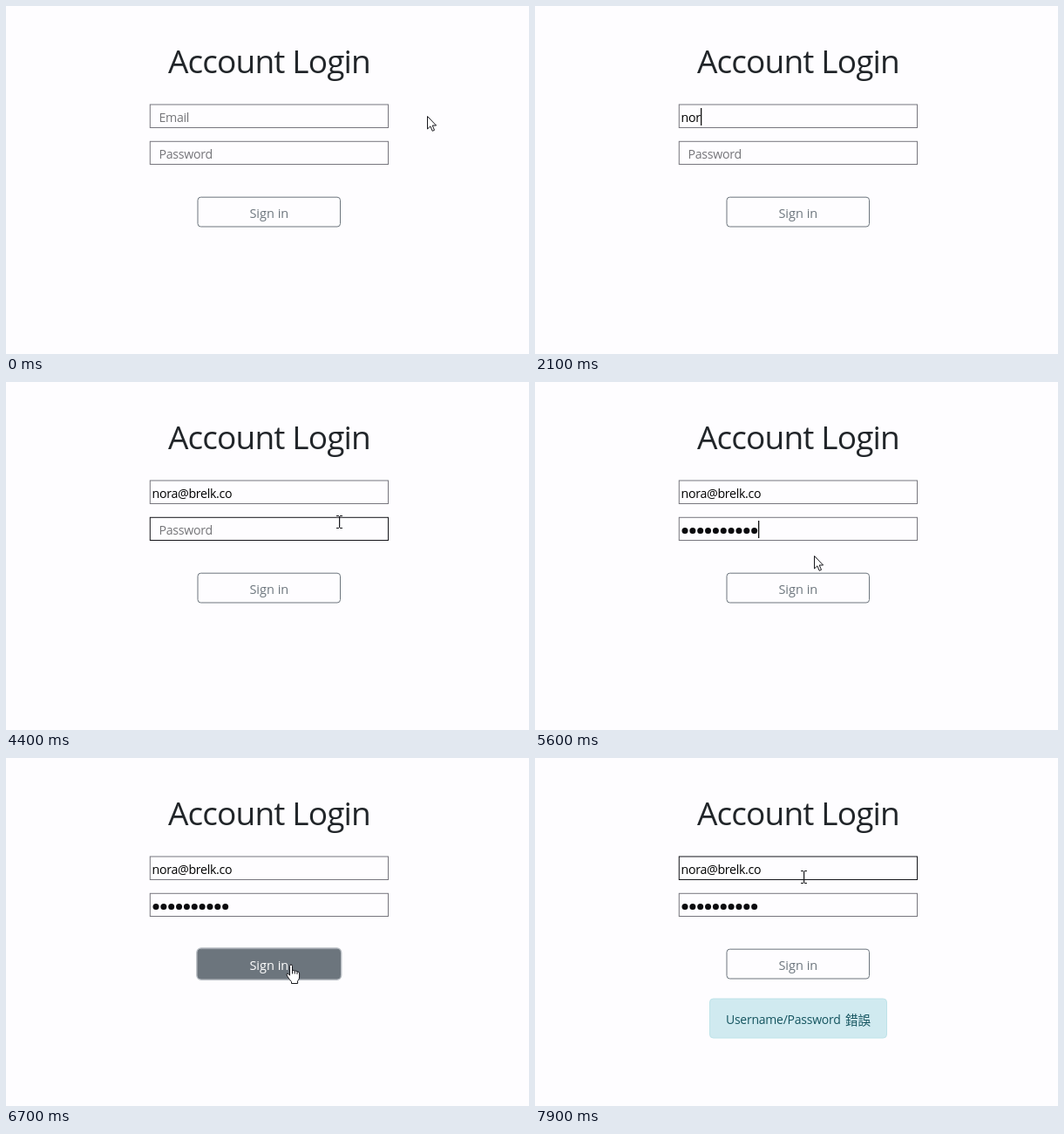
These frames come from a looping animation (600x399 px, 8 s). An HTML page with a canvas:

```html
<!DOCTYPE html>
<html lang="zh-Hant">
<head>
<meta charset="utf-8">
<title>Account Login</title>
<style>
  html, body { margin: 0; width: 100%; height: 100%; overflow: hidden; background: #fefdff; }
  canvas { display: block; }
</style>
</head>
<body>
<canvas id="stage" width="600" height="399"></canvas>
<script>
const ctx = document.getElementById('stage').getContext('2d');
const LOOP = 8000, STEP = 100;
const SANS = '"Open Sans", "Noto Sans", sans-serif';
const CJK = '"Noto Sans CJK TC", "Noto Sans CJK", "Noto Sans CJK JP", sans-serif';
const ADDRESS = 'nora@brelk.co';
const GREY = '#6c757d';

const emailBox = { x: 165.3, y: 113, w: 273.2, h: 26.5 };
const passBox = { x: 165.3, y: 155.3, w: 273.2, h: 26.2 };
const button = { x: 220, y: 219.2, w: 163.5, h: 33.8 };

// Pointer tracks: [time, x, y], straight lines between points
const tracks = [
  [[0, 483, 126], [500, 362, 122], [1100, 359, 122], [1200, 350, 122],
   [1400, 330, 127], [1500, 330, 127], [1800, 270, 127], [2000, 270, 127]],
  [[4000, 508, 141], [4600, 320, 169], [5500, 320, 169], [5600, 320, 199],
   [5700, 320, 209], [5800, 320, 209], [6500, 327, 237], [7400, 327, 237], [7900, 309, 136]]
];

const during = (t, a, b) => t >= a && t < b;
const ramp = (t, a, b) => Math.min(1, Math.max(0, (t - a) / (b - a)));
const mix = (a, b, k) => a + (b - a) * k;
const inside = (p, r) => !!p && p.x >= r.x && p.x <= r.x + r.w && p.y >= r.y && p.y <= r.y + r.h;

function pointerAt(t) {
  for (const track of tracks) {
    if (t < track[0][0] || t > track[track.length - 1][0]) continue;
    const i = Math.max(1, track.findIndex(p => p[0] >= t));
    const [a, b] = [track[i - 1], track[i]];
    const k = ramp(t, a[0], b[0]);
    return { x: mix(a[1], b[1], k), y: mix(a[2], b[2], k) };
  }
  return null;
}

function label(str, x, y, size, color, spacing = 0, family = SANS) {
  ctx.font = `${size}px ${family}`;
  ctx.letterSpacing = spacing + 'px';
  ctx.fillStyle = color;
  ctx.fillText(str, x, y);
}

function roundBox(r, radius, grow = 0) {
  ctx.beginPath();
  ctx.roundRect(r.x - grow, r.y - grow, r.w + 2 * grow, r.h + 2 * grow, radius + grow);
}

function field(r, hover) {
  ctx.lineWidth = 1;
  ctx.strokeStyle = hover ? '#15151a' : '#77767e';
  ctx.strokeRect(r.x, r.y, r.w, r.h);
}

function caret(x, y) {
  ctx.fillStyle = '#111';
  ctx.fillRect(x, y, 1.3, 20);
}

function shape(path, x, y) {
  ctx.save();
  ctx.translate(Math.round(x), Math.round(y));
  const p = new Path2D(path);
  ctx.fillStyle = '#fff';
  ctx.strokeStyle = '#17171c';
  ctx.lineWidth = 1;
  ctx.lineJoin = 'round';
  ctx.fill(p);
  ctx.stroke(p);
  ctx.restore();
}

const arrow = (x, y) =>
  shape('M.5 .5V15L3.9 11.9 6.2 17.3 8.5 16.3 6.2 11H10.6Z', x, y);

const hand = (x, y) => shape(
  'M-1.5 1.5Q-1.5 0 0 0T1.5 1.5V7Q3 5.6 4.3 7.3Q6 6.3 7 8Q9.5 7.4 9.6 10V14' +
  'Q9.5 17 7.6 18.6V21.5H.5V19.5Q-2 17-4.2 13.2Q-5.8 10.6-4.4 10.1Q-3.2 9.8-1.5 12.2Z' +
  'M1.5 7V10.5M4.3 7.3V10.5M7 8V11', x, y);

function beam(x, y) {
  x = Math.round(x);
  y = Math.round(y);
  ctx.fillStyle = '#17171c';
  ctx.fillRect(x - 1, y - 6, 1.2, 13);
  for (const end of [-7, 7]) {
    ctx.fillRect(x - 4, y + end, 3, 1);
    ctx.fillRect(x, y + end, 3, 1);
  }
}

function drawEmail(t, hover) {
  field(emailBox, hover);
  const count = t < 2100 ? 0 : Math.min(13, Math.ceil((t - 2000) / 100 * 13 / 6));
  if (count) label(ADDRESS.slice(0, count), 167.5, 133, 14.2, '#000', -.3);
  else label('Email', 175.5, 133, 14.2, '#757579', -.3);

  if (during(t, 700, 900) || during(t, 1200, 1400)) caret(167, 117);
  if (during(t, 2100, 2800) || during(t, 3400, 3500)) {
    const end = 167.5 + ctx.measureText(ADDRESS.slice(0, count)).width;
    caret(Math.round(end), 117);
  }
}

function drawPassword(t, hover) {
  field(passBox, hover);
  const filled = t >= 5000;
  if (filled) {
    ctx.fillStyle = '#0b0b0e';
    for (let i = 0; i < 10; i++) {
      ctx.beginPath();
      ctx.arc(172 + i * 8.85, 170.5, 3.5, 0, 7);
      ctx.fill();
    }
  } else {
    label('Password', 175.5, 175, 14.2, '#757579', -.3);
  }
  if (during(t, 4600, 6600)) caret(filled ? 256 : 167, 159);
}

function drawButton(t) {
  const fill = ramp(t, 5900, 6100) * (1 - ramp(t, 7400, 7550));
  const ring = ramp(t, 6500, 6700) * (1 - ramp(t, 6700, 6900));
  if (ring) {
    roundBox(button, 4, 1);
    ctx.globalAlpha = ring;
    ctx.strokeStyle = '#b9bec4';
    ctx.lineWidth = 1.8;
    ctx.stroke();
  }
  roundBox(button, 3.5);
  ctx.globalAlpha = fill;
  ctx.fillStyle = GREY;
  ctx.fill();
  ctx.globalAlpha = 1;
  ctx.strokeStyle = GREY;
  ctx.lineWidth = 1;
  ctx.stroke();
  const tone = [108, 117, 125].map(c => Math.round(mix(c, 255, fill)));
  label('Sign in', 279.4, 242.5, 14.5, `rgb(${tone})`);
}

function drawAlert() {
  roundBox({ x: 200.5, y: 276, w: 203, h: 45 }, 4);
  ctx.fillStyle = '#d0eaf0';
  ctx.fill();
  ctx.strokeStyle = '#bee3e9';
  ctx.lineWidth = 1;
  ctx.stroke();
  label('Username/Password', 219, 305, 14, '#14545f', -.25);
  label('錯誤', 356, 305.5, 14.6, '#14545f', 0, CJK);
}

function draw(t) {
  ctx.fillStyle = '#fefdff';
  ctx.fillRect(0, 0, 600, 399);
  label('Account Login', 186, 77, 37, '#212529', -.85);

  const p = pointerAt(t);
  const onEmail = inside(p, emailBox), onPass = inside(p, passBox);
  drawEmail(t, onEmail);
  drawPassword(t, onPass);
  drawButton(t);
  if (t >= 6900) drawAlert();

  if (!p) return;
  const cursor = onEmail || onPass ? beam : inside(p, button) ? hand : arrow;
  cursor(p.x, p.y);
}

const start = performance.now();
function tick() {
  const t = (performance.now() - start) % LOOP;
  draw(Math.floor(t / STEP) * STEP);
  requestAnimationFrame(tick);
}
tick();
</script>
</body>
</html>
```
